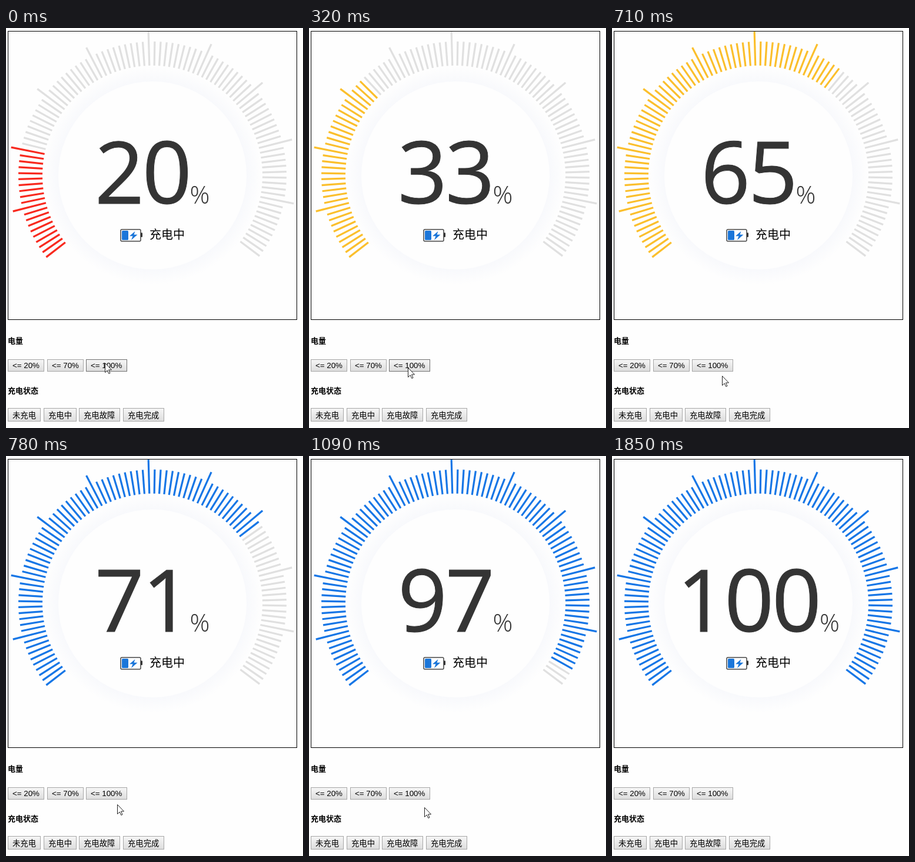
Recreate the animation shown at these times as an HTML page. Size 505 by 681 pixels, loop 2230 ms.

```html
<!DOCTYPE html>
<html lang="zh-CN">
<head>
<meta charset="utf-8">
<title>充电</title>
<style>
html, body { margin: 0; height: 100%; overflow: hidden; background: #fefefe; }
svg { display: block; }
text { font-family: "Liberation Sans", Arial, "Noto Sans CJK SC", "Noto Sans CJK", sans-serif; font-size: 13.33px; }
.big, .unit { font-family: "Open Sans", "Noto Sans", sans-serif; fill: #343434; }
.big { font-size: 147px; letter-spacing: -3.3px; stroke: #343434; stroke-width: 1; }
.unit { font-size: 42px; font-weight: 300; }
.cjk { font-family: "Noto Sans CJK SC", "Noto Sans CJK", sans-serif; }
.head { font-size: 13px; font-weight: bold; }
.state { font-size: 20px; font-weight: 300; }
</style>
</head>
<body>
<svg width="505" height="681" viewBox="0 0 505 681">
  <defs>
    <linearGradient id="face" x2="0" y2="1">
      <stop stop-color="#f6f6f6"/><stop offset="1" stop-color="#ddd"/>
    </linearGradient>
    <radialGradient id="glow">
      <stop offset=".86" stop-color="#f8f9fc"/><stop offset="1" stop-color="#f8f9fc" stop-opacity="0"/>
    </radialGradient>
  </defs>
  <rect x="3.5" y="5.5" width="491" height="491" fill="none" stroke="#000"/>
  <circle cx="249" cy="251" r="186" fill="url(#glow)"/>
  <circle cx="249" cy="251" r="160" fill="#fefefe"/>
  <g id="ticks" stroke-width="3.2"></g>
  <g id="reading">
    <text id="digits" class="big" x="151" y="299"></text>
    <text id="unit" class="unit" y="299">%</text>
  </g>
  <rect x="195" y="343" width="34" height="20" rx="2" fill="#fefefe" stroke="#444" stroke-width="1.5"/>
  <rect x="229" y="348.5" width="3" height="7.5" rx="1" fill="#333"/>
  <rect x="197" y="345" width="11" height="16" rx="1.5" fill="#1b76d9"/>
  <path d="M219.5 346L210 354.2H215.5L213 361L223.5 351.8H217.5Z" fill="#1b76d9"/>
  <text class="cjk state" x="244" y="358.5">充电中</text>
  <text class="cjk head" x="3" y="537">电量</text>
  <text class="cjk head" x="3" y="622">充电状态</text>
  <g id="buttons"></g>
  <path id="cursor" d="M.5.5V16.500L4.200 13L6.800 18.500L9 17.500L6.500 12H11.500Z" fill="#fff" stroke="#222"/>
</svg>
<script>
const LOOP = 2230, FRAME = 76.8, LAST = 24;
const START = 142.4, STEP = 360 / 140, DIGIT = 80.8;
// Cursor key points: frame, x, y
const PATH = [[0, 168, 570], [4, 168, 578], [7, 183, 590], [14, 196, 598],
  [19, 235, 617], [22, 459, 672], [LAST, 505, 685]];

const $ = id => document.getElementById(id);

function add(parent, tag, attrs, text = '') {
  const el = document.createElementNS('http://www.w3.org/2000/svg', tag);
  for (const key in attrs) el.setAttribute(key, attrs[key]);
  el.textContent = text;
  return parent.appendChild(el);
}

// Lays out a row of buttons and returns their faces
function buttonRow(labels, y, height, baseline) {
  let left = 3;
  return labels.map(label => {
    const x = Math.round(left);
    const text = add($('buttons'), 'text', { x: x + 8, y: baseline }, label);
    const width = Math.ceil(text.getComputedTextLength() + 15.9);
    const face = add($('buttons'), 'rect', {
      x: x + .5, y: y + .5, width: width - 1, height: height - 1, fill: 'url(#face)', stroke: '#a6a6a6'
    });
    text.before(face);
    left += width + 4.6;
    return face;
  });
}

const ticks = Array.from({ length: 100 }, (_, i) => add($('ticks'), 'line', {
  x1: 187, x2: i % 10 == 9 && i < 99 ? 245 : 228,
  transform: `translate(249 251) rotate(${START + i * STEP})`
}));

const full = buttonRow(['<= 20%', '<= 70%', '<= 100%'], 564, 21, 579)[2];
buttonRow(['未充电', '充电中', '充电故障', '充电完成'], 647, 23, 664);

function cursorAt(frame) {
  const i = Math.max(1, PATH.findIndex(p => p[0] >= frame));
  const [f0, x0, y0] = PATH[i - 1], [f1, x1, y1] = PATH[i];
  const k = (frame - f0) / (f1 - f0);
  return [Math.round(x0 + (x1 - x0) * k), Math.round(y0 + (y1 - y0) * k)];
}

function draw(now) {
  const frame = Math.min(LAST, Math.floor(now % LOOP / FRAME));
  const value = Math.max(20, Math.min(100, Math.round(7.4 + 6.4 * frame)));
  const color = value <= 20 ? '#f8291e' : value <= 70 ? '#fbbf2c' : '#1676e6';
  ticks.forEach((tick, i) => tick.setAttribute('stroke', i < value ? color : '#e0e0e0'));

  const count = String(value).length;
  $('digits').textContent = value;
  $('unit').setAttribute('x', 151 + count * DIGIT);
  $('reading').setAttribute('transform', `translate(${(2 - count) * DIGIT / 2})`);

  const [x, y] = cursorAt(frame);
  $('cursor').setAttribute('transform', `translate(${x} ${y})`);
  full.setAttribute('stroke', y < 585 ? '#707070' : '#a6a6a6');
  requestAnimationFrame(draw);
}
draw(0);
</script>
</body>
</html>
```
